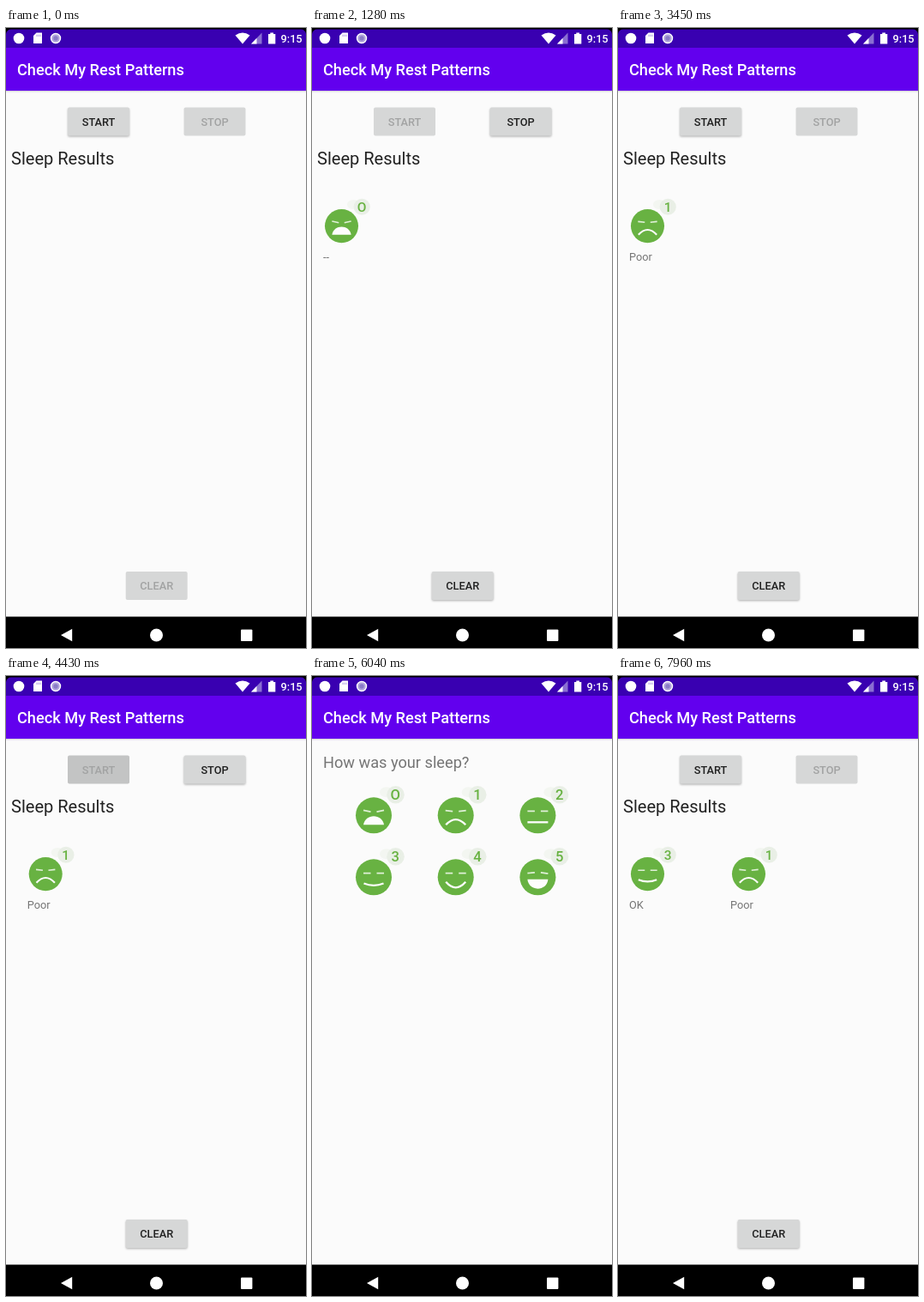
Recreate the animation shown at these times as an HTML page. Size 350 by 722 pixels, loop 8000 ms.

```html
<!DOCTYPE html>
<html lang="en">
<head>
<meta charset="utf-8">
<title>Sleep tracker</title>
<style>
  html, body { margin: 0; width: 100%; height: 100%; overflow: hidden; background: #fbfbfb; }
  svg { display: block; width: 350px; height: 722px; font-family: Roboto, sans-serif; }
  .medium { font-weight: 500; }
</style>
</head>
<body>
<svg id="stage" viewBox="0 0 350 722">
  <defs>
    <linearGradient id="barShadow" x1="0" y1="0" x2="0" y2="1">
      <stop offset="0" stop-color="#a3a3a8"/>
      <stop offset="1" stop-color="#fbfbfb" stop-opacity="0"/>
    </linearGradient>
    <filter id="soft" x="-10%" y="-20%" width="120%" height="150%">
      <feGaussianBlur stdDeviation="0.9"/>
    </filter>
  </defs>

  <rect width="350" height="722" fill="#fbfbfb"/>
  <g id="home">
    <text x="6" y="159" font-size="20.05" fill="#212121">Sleep Results</text>
  </g>
  <g id="quality">
    <text x="13" y="107" font-size="18.2" fill="#757575">How was your sleep?</text>
  </g>

  <rect y="72" width="350" height="4" fill="url(#barShadow)"/>
  <rect y="22" width="350" height="51" fill="#6200ee"/>
  <rect width="350" height="23" fill="#3900b1"/>
  <path d="M0 0H350V7Q349 1.5 344 1.5H6Q1 1.5 0 7Z" fill="#000"/>
  <text class="medium" x="13" y="55" font-size="18.2" fill="#fff">Check My Rest Patterns</text>

  <g fill="#fff">
    <circle cx="15" cy="12" r="6.3"/>
    <path d="M35.5 5.5H42V18H32V9Z"/>
    <path d="M36 7.5v2.5M38 7.5v2.5M40 7.5v2.5" stroke="#9d86d8" stroke-width="0.8"/>
    <circle cx="58" cy="12" r="5.5" fill="#b3a6dc" stroke="#fff" stroke-width="1.4"/>
    <circle cx="58" cy="12" r="2.7" fill="#8a7bc8"/>
    <path d="M267.5 8.5Q276 2.5 284.5 8.5L276 18.5Z"/>
    <path d="M298.5 5.5V18.5H286Z" fill="#8a6fd2"/>
    <path d="M292.5 11.7V18.5H286Z"/>
    <path d="M306 7H308.3V5.5H312V7H314.3V18.5H306Z"/>
    <text class="medium" x="320.5" y="16.5" font-size="12.75">9:15</text>
  </g>

  <rect y="685.5" width="350" height="36.5" fill="#000"/>
  <g fill="#fff">
    <path d="M64 707L77.2 699.8V714.2Z"/>
    <circle cx="175.5" cy="707" r="7.5"/>
    <rect x="274" y="700.5" width="13.4" height="13.4" rx="1"/>
  </g>
</svg>

<script>
const NS = "http://www.w3.org/2000/svg";
const LOOP = 8000;
const $ = id => document.getElementById(id);

function add(parent, tag, attrs, text) {
  const el = document.createElementNS(NS, tag);
  for (const key in attrs) el.setAttribute(key, attrs[key]);
  if (text !== undefined) el.textContent = text;
  parent.appendChild(el);
  return el;
}

const clamp = x => Math.min(1, Math.max(0, x));
const span = (t, start, length) => clamp((t - start) / length);
const easeOut = x => 1 - (1 - x) ** 2;
const easeBoth = x => (1 - Math.cos(Math.PI * x)) / 2;
const within = (t, ranges) => ranges.some(([a, b]) => t >= a && t < b);

// Faces are drawn around 0,0 with radius 21.
const FACES = [
  { eyes: "M-12 -6L-3.5 -4.2M3.5 -4.2L12 -6", mouth: "M-12 11C-10 -2.5 10 -2.5 12 11Z", solid: true },
  { eyes: "M-12 -5.6L-3.5 -4.6M3.5 -4.6L12 -5.6", mouth: "M-11.5 11Q0 -1.5 11.5 11" },
  { eyes: "M-12 -5H-3.5M3.5 -5H12", mouth: "M-12 8H12" },
  { eyes: "M-12 -4.6H-3.5M3.5 -4.6H12", mouth: "M-11.5 7.2Q0 11.8 11.5 7.2" },
  { eyes: "M-12 -4.6H-3.5M3.5 -4.6H12", mouth: "M-11.5 5.5Q0 18.5 11.5 5.5" },
  { eyes: "M-12 -4.6L-3.5 -5.4M3.5 -5.4L12 -4.2", mouth: "M-12 2.5H12C10.5 17 -10.5 17 -12 2.5Z", solid: true }
];

function drawFace(parent, kind, x, y, scale) {
  const { eyes, mouth, solid } = FACES[kind];
  const g = add(parent, "g", { transform: `translate(${x} ${y}) scale(${scale})` });
  add(g, "ellipse", { cx: 15, cy: -27, rx: 8, ry: 6, fill: "#f3f6f1" });
  add(g, "circle", { cx: 25.5, cy: -24, r: 10.3, fill: "#e9efe6" });
  add(g, "circle", { r: 21, fill: "#68b242" });
  add(g, "path", { d: eyes, fill: "none", stroke: "#e0f0d8", "stroke-width": 1.7 });
  add(g, "path", {
    d: mouth, fill: solid ? "#fdfdfd" : "none",
    stroke: solid ? "none" : "#fdfdfd", "stroke-width": 2.3
  });
  // The zero is as round as a capital O.
  add(g, "text", {
    x: 25.3, y: -18.2, class: "medium", "font-size": 16.6,
    "text-anchor": "middle", fill: "#68b242"
  }, kind || "O");
}

FACES.forEach((_, i) => drawFace($("quality"), i, 72 + (i % 3) * 95.7, i < 3 ? 162.3 : 234.3, 1));

const homeTimes = [[0, 1870], [3020, 5960], [7400, LOOP]];
const running = [[300, 1870], [4340, 5960]];

const buttons = [
  { label: "START", x: 72, y: 92.5, presses: [130, 4170], enabled: t => !within(t, running) },
  { label: "STOP", x: 207.5, y: 92.5, presses: [1700, 5790], enabled: t => within(t, running) },
  { label: "CLEAR", x: 139.7, y: 633, presses: [], enabled: t => t >= 300 }
];

buttons.forEach((b, i) => {
  const g = add($("home"), "g", { transform: `translate(${b.x} ${b.y})` });
  const box = { width: 72, height: 33, rx: 2 };
  b.shadow = add(g, "rect", { ...box, y: 1.3, fill: "#a0a0a0", filter: "url(#soft)" });
  add(g, "rect", { ...box, fill: "#d6d7d7" });
  add(add(g, "clipPath", { id: "clip" + i }), "rect", box);
  b.ripple = add(g, "circle", { cx: 36, cy: 16.5, fill: "#000", "clip-path": `url(#clip${i})` });
  b.text = add(g, "text", {
    x: 36, y: 21.2, class: "medium", "font-size": 12.75, "text-anchor": "middle"
  }, b.label);
});

// Each night: face, caption, time shown, fade start, fade length, first slot, shift time.
const nights = [
  [0, "--", [0, 1870], 340, 120, 0],
  [1, "Poor", [3020, 5960], 3070, 120, 0, 4380],
  [0, "--", [3020, 5960], 4630, 120, 0],
  [3, "OK", [7400, LOOP], 7450, 120, 0],
  [1, "Poor", [7400, LOOP], 7450, 120, 1]
].map(([kind, caption, shown, fade, length, slot, shift]) => {
  const el = add($("home"), "g", {});
  drawFace(el, kind, 34.5, 230.6, 0.93);
  add(el, "text", { x: 13, y: 271.3, "font-size": 12.75, fill: "#757575" }, caption);
  return { el, shown, fade, length, slot, shift };
});

function drawButton(b, t) {
  const on = b.enabled(t);
  const start = b.presses.filter(p => p <= t).pop();
  const age = start === undefined ? Infinity : t - start;
  const lift = age < 300 ? Math.sin(Math.PI * age / 300) : 0;
  b.text.setAttribute("fill", on ? "#212121" : "#a2a3a3");
  b.shadow.setAttribute("opacity", on ? 0.75 : 0);
  b.shadow.setAttribute("y", 1.3 + lift);
  b.ripple.setAttribute("r", 6 + 36 * easeOut(clamp(age / 225)));
  b.ripple.setAttribute("opacity", 0.12 * clamp(age / 75) * (1 - clamp((age - 225) / 150)));
}

function render(t) {
  const home = within(t, homeTimes);
  $("home").style.display = home ? "" : "none";
  $("quality").style.display = home ? "none" : "";
  buttons.forEach(b => drawButton(b, t));
  for (const n of nights) {
    const slot = n.slot + (n.shift ? easeBoth(span(t, n.shift, 250)) : 0);
    n.el.setAttribute("transform", `translate(${118 * slot} 0)`);
    n.el.setAttribute("opacity", within(t, [n.shown]) ? span(t, n.fade, n.length) : 0);
  }
}

const origin = performance.now();
function tick() {
  render((performance.now() - origin) % LOOP);
  requestAnimationFrame(tick);
}
tick();
</script>
</body>
</html>
```
